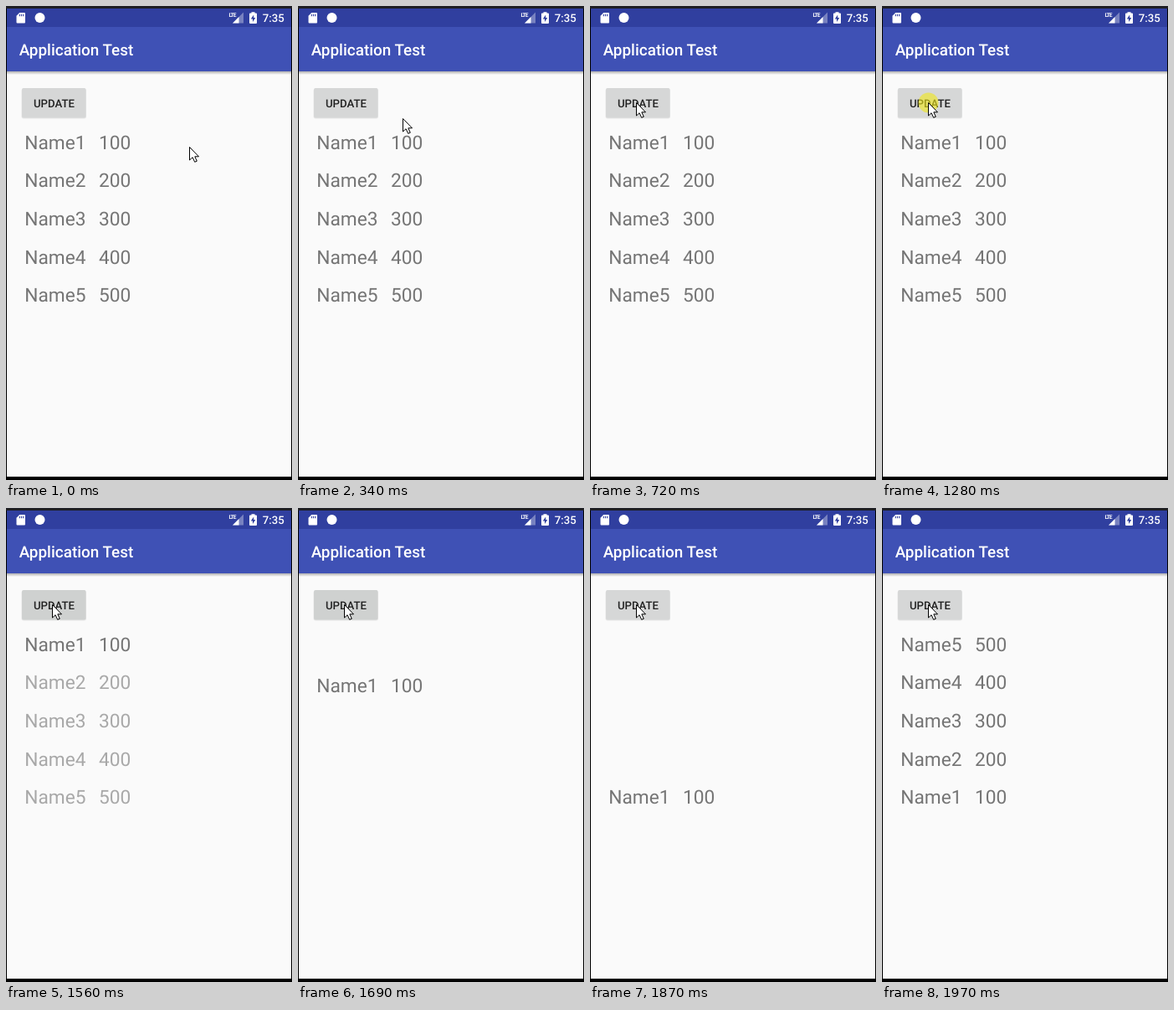
An HTML page that plays this animation: 342x566 px, repeating every 3310 ms.

```html
<!DOCTYPE html>
<html lang="en">
<head>
<meta charset="utf-8">
<title>Application Test</title>
<style>
  html, body { margin: 0; width: 100%; height: 100%; overflow: hidden; background: #000; }
  svg { display: block; width: 342px; height: 566px; font-family: Roboto, sans-serif; text-rendering: geometricPrecision; }
  .medium { font-weight: 500; }
  .row { font-size: 22.7px; fill: #757575; }
</style>
</head>
<body>
<svg viewBox="0 0 342 566">
  <defs>
    <linearGradient id="shade" x2="0" y2="1">
      <stop offset="0" stop-color="#000" stop-opacity=".3"/>
      <stop offset="1" stop-color="#000" stop-opacity="0"/>
    </linearGradient>
  </defs>
  <rect width="342" height="566" fill="#000"/>
  <rect width="342" height="3" fill="#1f1f24"/>
  <rect x="1" y="3" width="340" height="559" fill="#fafafa"/>
  <rect x="1" y="78" width="340" height="4" fill="url(#shade)"/>
  <rect x="1" y="25" width="340" height="53" fill="#3f51b5"/>
  <rect x="1" y="3" width="340" height="22" fill="#303f9f"/>

  <!-- status bar -->
  <g fill="#fff">
    <path d="M16.2 8H22q1 0 1 1v10.500q0 1-1 1H13.500q-1 0-1-1V11.700Z"/>
    <path d="M16.300 9.700v2.500M18.500 9.700v2.500M20.700 9.700v2.500" stroke="#303f9f" stroke-width="1.100"/>
    <circle cx="40.500" cy="14" r="6"/>
    <path d="M284 7.500V20.500H271Z" opacity=".35"/>
    <path d="M278.500 13V20.500H271Z"/>
    <rect x="266" y="6" width="10" height="8" fill="#303f9f"/>
    <text x="266.500" y="13.200" font-size="6.600" font-weight="700" textLength="9" lengthAdjust="spacing">LTE</text>
    <path d="M293.500 8.500V7.200h4V8.500H299q1 0 1 1V20q0 1-1 1H292q-1 0-1-1V9.500q0-1 1-1Z"/>
    <path d="M296.200 10.500 292.800 15.400H295V19L298.300 13.900H296.200Z" fill="#303f9f"/>
    <text class="medium" x="306.700" y="19" font-size="13.200">7:35</text>
    <text class="medium" x="15.700" y="59" font-size="18.900">Application Test</text>
  </g>

  <!-- button -->
  <rect x="18.500" y="98.500" width="77.500" height="36" rx="2.500" fill="#000" opacity=".08"/>
  <rect id="button" x="19" y="98" width="76.500" height="35.500" rx="2" fill="#d6d7d7"/>
  <text class="medium" x="57.400" y="121" font-size="13.200" fill="#212121" text-anchor="middle">UPDATE</text>

  <g id="rows"></g>
  <circle id="click" cx="55.500" cy="115.500" r="12" fill="#f0e818" fill-opacity=".6"/>
  <path id="cursor" d="M.5.500V16L4.100 12.700 6.700 18.300 9.300 17.200 6.800 11.800H11.500Z" fill="#fff" stroke="#000"/>
</svg>
<script>
const LOOP = 3310, TOP = 170.6, PITCH = 45.7;
const $ = id => document.getElementById(id);

// [time, x, y], each pose held until the next
const cursorPath = [
  [0, 219, 168], [210, 203, 163], [250, 178, 154], [300, 150, 144],
  [340, 125, 134], [390, 104, 127], [430, 88, 122], [480, 76, 119],
  [530, 68, 117], [570, 62, 116], [620, 58, 115], [670, 56, 115], [720, 55, 115]
];
const clickSteps = [[0, 0], [1280, 1], [1360, .5], [1410, 0]];
const shadeSteps = [[0, '#d6d7d7'], [1410, '#d2d3d3'], [1560, '#cfd1d0'], [1740, '#d2d4d3'], [1870, '#d6d7d7']];
const rowTimes = [0, 1560, 1600, 1650, 1690, 1740, 1780, 1830, 1870, 1920, 1970].map(t => [t]);

const clamp = v => Math.min(1, Math.max(0, v));
const ease = v => (1 - Math.cos(Math.PI * clamp(v))) / 2;
const held = (steps, t) => steps.findLast(s => s[0] <= t);

function makeRow(n) {
  const g = document.createElementNS('http://www.w3.org/2000/svg', 'g');
  g.setAttribute('class', 'row');
  g.innerHTML = `<text x="22.300">Name${n}</text><text x="110.900">${n * 100}</text>`;
  $('rows').append(g);
  return g;
}
const rows = [1, 2, 3, 4, 5].map(makeRow);

function drawRows(time) {
  const [t] = held(rowTimes, time);
  const out = 1 - clamp((t - 1515) / 115);
  const back = t >= 1970 ? 1 : clamp((t - 1870) / 115);
  const move = ease((t - 1603) / 250);
  rows.forEach((row, i) => {
    const slot = i ? (t < 1800 ? i : 4 - i) : 4 * move;
    row.setAttribute('transform', `translate(0 ${TOP + PITCH * slot})`);
    row.setAttribute('opacity', i ? (t < 1800 ? out : back) : 1);
  });
}

function draw(t) {
  const [, x, y] = held(cursorPath, t);
  $('cursor').setAttribute('transform', `translate(${x} ${y})`);
  $('click').setAttribute('opacity', held(clickSteps, t)[1]);
  $('button').setAttribute('fill', held(shadeSteps, t)[1]);
  drawRows(t);
}

const start = performance.now();
function tick() {
  draw((performance.now() - start) % LOOP);
  requestAnimationFrame(tick);
}
tick();
</script>
</body>
</html>
```
